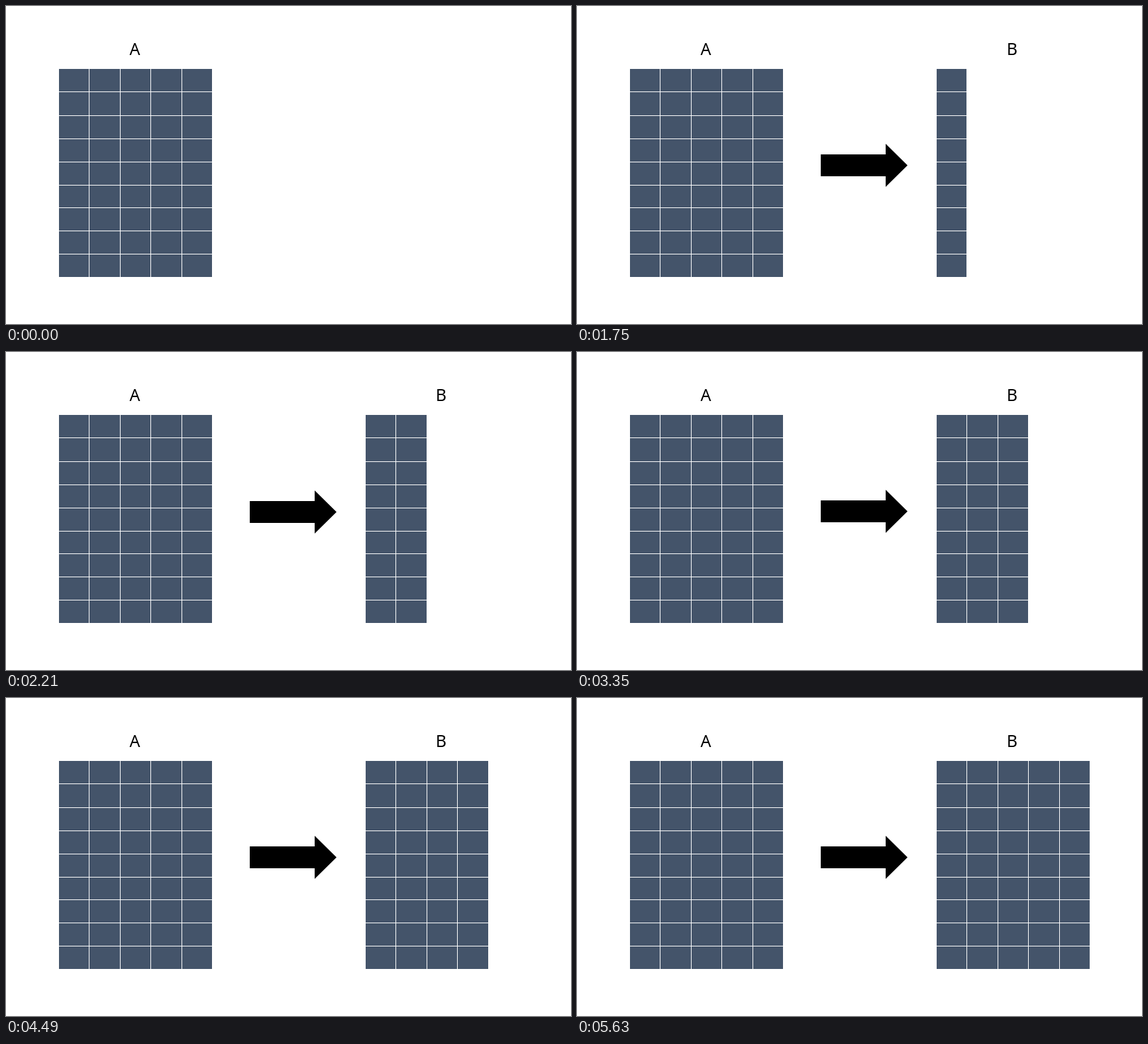
These frames come from a looping animation (853 by 480 pixels, 6.77 s). An HTML page:

```html
<!DOCTYPE html>
<html lang="en">
<head>
<meta charset="utf-8">
<title>Copying a matrix column by column</title>
<style>
  html, body { margin: 0; width: 100%; height: 100%; overflow: hidden; background: #fff; }
  svg { display: block; width: 853px; height: 480px; }
  text { font: 25px "Noto Sans", "Open Sans", sans-serif; text-anchor: middle; }

  .result, .arrow, .cover { animation: 6770ms step-end infinite; }
  .result { animation-name: appear; }
  .arrow { animation-name: nudge; }
  .cover { animation-name: uncover; }

  /* 1070, 2210, 3350, 4490 and 5630 ms of 6770 ms */
  @keyframes appear {
    0% { visibility: hidden; }
    15.805%, 100% { visibility: visible; }
  }
  @keyframes nudge {
    0% { transform: translateY(0); }
    32.644% { transform: translateY(1px); }
    49.483%, 100% { transform: translateY(0); }
  }
  @keyframes uncover {
    0% { transform: translateX(45px); }
    32.644% { transform: translateX(92px); }
    49.483% { transform: translateX(138px); }
    66.322% { transform: translateX(185px); }
    83.161%, 100% { transform: translateX(231px); }
  }
</style>
</head>
<body>
<svg viewBox="0 0 853 480">
  <defs>
    <g id="matrix" shape-rendering="crispEdges">
      <rect width="231" height="314" fill="#44546a"/>
      <path fill="none" stroke="#fff" d="M45.5 0v314M92.5 0v314M138.5 0v314M185.5 0v314
        M0 34.5h231M0 70.5h231M0 105.5h231M0 140.5h231M0 175.5h231M0 209.5h231M0 244.5h231M0 279.5h231"/>
    </g>
  </defs>

  <text x="194.5" y="74">A</text>
  <use href="#matrix" x="80" y="95"/>

  <g class="result">
    <path class="arrow" d="M368 224H466V208L499 240.5L466 273V257H368Z"/>
    <text x="657" y="74">B</text>
    <use href="#matrix" x="543" y="95"/>
    <rect class="cover" x="543" y="95" width="232" height="314" fill="#fff"/>
  </g>
</svg>
</body>
</html>
```
